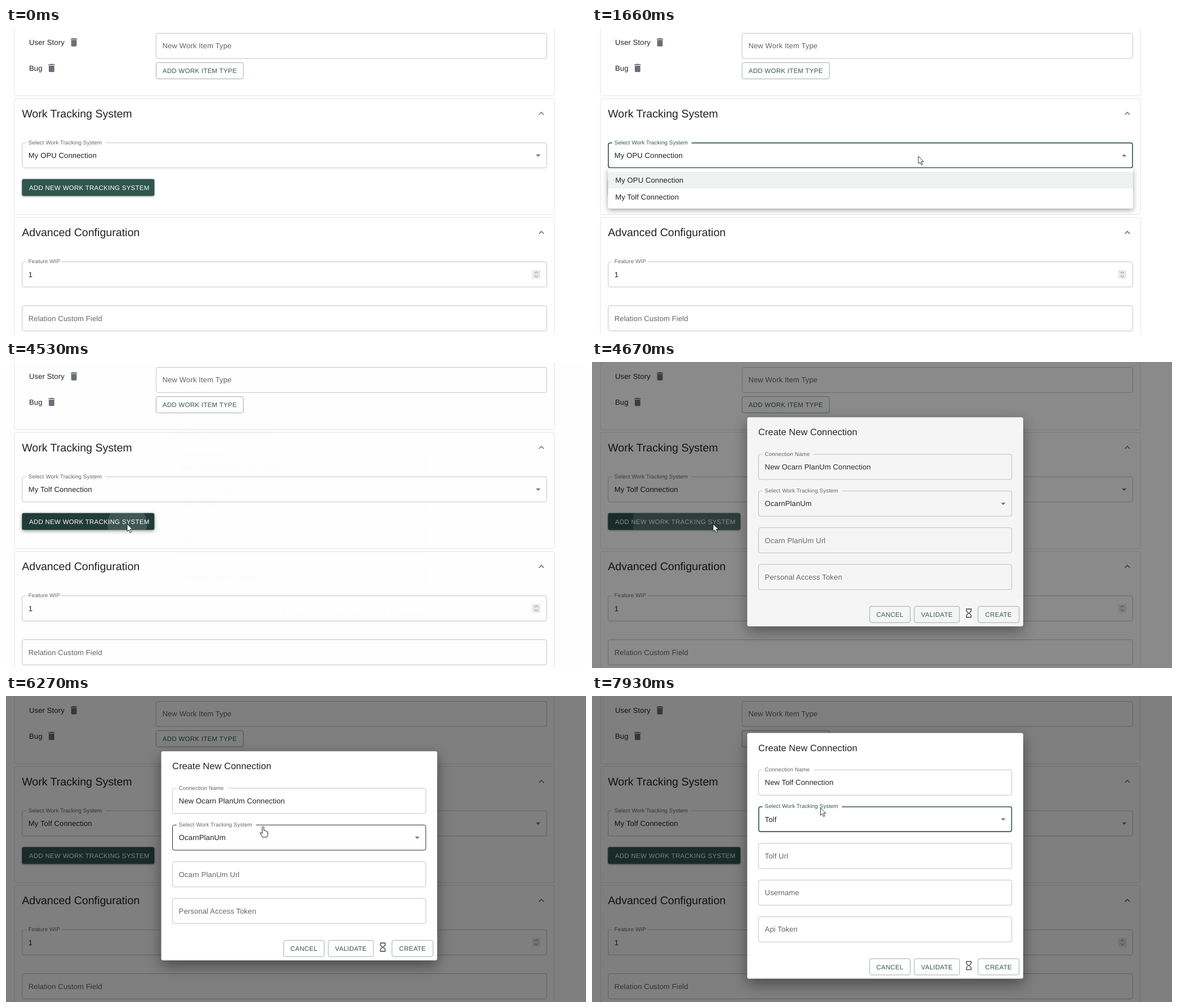
Recreate the animation shown at these times as an HTML page. Size 1029 by 544 pixels, loop 8 s.

```html
<!DOCTYPE html>
<html lang="en">
<head>
<meta charset="utf-8">
<title>Work tracking settings</title>
<style>
  html, body { margin: 0; width: 100%; height: 100%; overflow: hidden; background: #fff; }
  #stage { display: block; width: 100vw; height: 100vh; }
  text { font-family: "Liberation Sans", Arial, sans-serif; fill: #212121; white-space: pre; text-rendering: geometricPrecision; }
  .body { font-size: 13.06px; letter-spacing: .12px; }
  .label { font-size: 9.8px; letter-spacing: .09px; }
  .button { font-size: 11.42px; letter-spacing: .326px; }
  .heading { font-size: 19.58px; }
  .title { font-size: 16.32px; letter-spacing: .12px; }
</style>
</head>
<body>
<svg id="stage" viewBox="0 0 1029 544"></svg>
<script>
const LOOP = 8000, STEP = 70, SCALE = .816, FIELD_H = 45.7, ROW_H = 29.4;
const PRIMARY = '#30574e', GREY = '#666', ICON = '#757575';
const SUITE = 'Ocarn PlanUm', SUITE_ID = 'OcarnPlanUm', TRACKER = 'Tolf';
const CONNECTIONS = ['My OPU Connection', `My ${TRACKER} Connection`];

// Activity bursts; inside each one the picture advances in fixed steps.
const BURSTS = [0, 190, 1040, 1660, 2340, 3180, 4390, 5230, 6200, 7020, 7860];

const EVENTS = {
  pageMenu: { open: 1100, press: 2350, close: 2473 },
  addButton: { hover: 3320, press: 4405, open: 4520 },
  dialogMenu: { open: 6480, press: 7300, close: 7440 },
};

// time, x, y, cursor shape from that moment on
const CURSOR = [
  [190, 1011, 534, 'arrow'], [400, 900, 330, 'arrow'], [610, 815, 232, 'hand'],
  [960, 579, 228, 'hand'], [1100, 579, 228, 'arrow'], [1660, 579, 228, 'arrow'],
  [1870, 541, 263, 'hand'], [2010, 522, 288, 'hand'], [2705, 522, 288, 'arrow'],
  [2820, 522, 288, 'arrow'], [3110, 437, 262, 'arrow'], [3320, 262, 283, 'hand'],
  [3530, 215, 288, 'hand'], [4520, 215, 288, 'arrow'], [4740, 215, 288, 'arrow'],
  [5090, 430, 203, 'beam'], [5160, 453, 194, 'beam'], [5230, 453, 194, 'beam'],
  [5710, 455, 208, 'beam'], [5780, 455, 211, 'arrow'], [6130, 455, 211, 'arrow'],
  [6270, 456, 232, 'hand'], [6410, 457, 249, 'hand'], [6480, 457, 249, 'arrow'],
  [6980, 457, 249, 'arrow'], [7090, 438, 280, 'hand'], [7160, 417, 309, 'hand'],
  [7250, 408, 322, 'hand'], [7600, 408, 322, 'hand'], [7672, 400, 318, 'arrow'],
  [7790, 351, 280, 'beam'], [7860, 401, 225, 'hand'], [7930, 405.5, 199, 'arrow'],
];

const SHAPES = {
  arrow: '<path d="M0 0V13.2L3 10.4 5.2 15.4 7.4 14.4 5.2 9.6H9.4Z" fill="#fff" stroke="#111" stroke-width=".85"/>',
  hand: '<path d="M-1.5 1.2Q0-.6 1.5 1.2V7.2Q3 6.4 4 7.8 5.4 7.2 6.3 8.6 8.2 8.2 8.4 10V14Q8.2 17 6.6 19H-.8Q-2.5 16-4.8 12.6-5.6 10.6-3.6 10.6L-1.5 12.4Z" fill="#fff" stroke="#111" stroke-width=".95"/>',
  beam: '<path d="M-3-8H-.6L0-7.4 .6-8H3M0-7.4V7.4M-3 8H-.6L0 7.4 .6 8H3" fill="none" stroke="#222"/>',
};

const ICONS = {
  trash: 'M6 19c0 1.1.9 2 2 2h8c1.1 0 2-.9 2-2V7H6zM19 4h-3.5l-1-1h-5l-1 1H5v2h14z',
  collapse: 'M12 8l-6 6 1.41 1.41L12 10.83l4.59 4.58L18 14z',
  caret: 'M7 10l5 5 5-5z',
  hourglass: 'M6 2v6l4 4-4 4v6h12v-6l-4-4 4-4V2zm10 14.5V20H8v-3.5l4-4zm-4-5-4-4V4h8v3.5z',
};

const clamp = v => Math.max(0, Math.min(1, v));
const mix = (a, b, p) => a + (b - a) * p;
const inside = (p, x, y, w, h) => p && p.x >= x && p.x <= x + w && p.y >= y && p.y <= y + h;

// cubic-bezier(.4, 0, .2, 1)
function ease(v) {
  const x = clamp(v);
  let low = 0, high = 1;
  for (let i = 0; i < 20; i++) {
    const u = (low + high) / 2, k = 1 - u;
    if (1.2 * k * k * u + .6 * k * u * u + u ** 3 < x) low = u; else high = u;
  }
  return 3 * (1 - low) * low * low + low ** 3;
}

function snap(t) {
  const start = BURSTS.filter(b => b <= t).pop();
  return start + Math.floor((t - start) / STEP) * STEP;
}

function cursorAt(t) {
  const i = CURSOR.findLastIndex(key => key[0] <= t);
  if (i < 0) return null;
  const a = CURSOR[i], b = CURSOR[i + 1] || a;
  const p = b === a ? 0 : (t - a[0]) / (b[0] - a[0]);
  return { x: mix(a[1], b[1], p), y: mix(a[2], b[2], p), shape: a[3] };
}

const text = (kind, x, y, str, fill = '#212121', anchor = 'start') =>
  `<text class="${kind}" x="${x}" y="${y}" text-anchor="${anchor}" style="fill:${fill}">${str}</text>`;

const rect = (x, y, w, h, attrs, r = 3.3) =>
  `<rect x="${x}" y="${y}" width="${w}" height="${h}" rx="${r}" ${attrs}/>`;

const icon = (name, x, y, fill = ICON, turn = 0) =>
  `<path d="${ICONS[name]}" fill="${fill}" transform="translate(${x} ${y}) rotate(${turn}) scale(${SCALE}) translate(-12 -12)"/>`;

const shadow = (y, blur, alpha) => `style="filter:drop-shadow(0 ${y}px ${blur}px rgba(0,0,0,${alpha}))"`;

// notch is the width of the gap in the outline that holds the small label
function field(x, y, w, { label, value, notch, state = 'idle' }) {
  const colour = { idle: '#c0c0c0', hover: '#212121', focus: PRIMARY }[state];
  const line = state === 'focus' ? 1.63 : .95;
  const outline = rect(x + line / 2, y + line / 2, w - line, FIELD_H - line,
    `fill="none" stroke="${colour}" stroke-width="${line}"`);
  if (!value) return outline + text('body', x + 11.6, y + 27.4, label, GREY);
  return outline + rect(x + 7.5, y - 1, notch, 4, 'fill="#fff"', 0)
    + text('label', x + 11.6, y + 3.2, label, state === 'focus' ? PRIMARY : GREY)
    + text('body', x + 11.6, y + 27.4, value);
}

const select = (x, y, w, options) => field(x, y, w, { label: 'Select Work Tracking System', notch: 141, ...options })
  + icon('caret', x + w - 15.7, y + 22.9, ICON, options.open ? 180 : 0);

const outlined = (x, y, w, str) =>
  rect(x + .45, y + .45, w - .9, 28.9, 'fill="none" stroke="#97aba6" stroke-width=".95"')
  + text('button', x + w / 2, y + 19, str, PRIMARY, 'middle');

function ripple(x, y, w, h, at, radius, colour, t, press, release) {
  if (t < press) return '';
  const p = ease((t - press) / 550);
  const alpha = (.1 + .2 * p) * (1 - ease((t - release) / 550));
  return `<svg x="${x}" y="${y}" width="${w}" height="${h}">
    <circle cx="${at.x - x}" cy="${at.y - y}" r="${radius * p}" fill="${colour}" opacity="${alpha}"/></svg>`;
}

const isOpen = (menu, t) => t >= menu.open && t < menu.close;

function dropdown(x, y, w, items, menu, cursor, t) {
  if (t < menu.open || t > menu.close + 232) return '';
  const closing = t >= menu.close;
  const opacity = closing ? 1 - ease((t - menu.close) / 232) : ease((t - menu.open) / 232);
  const s = closing ? 1 - .25 * ease((t - menu.close - 77) / 155) : .75 + .25 * ease((t - menu.open) / 155);
  const rows = items.map((item, i) => {
    const top = y + 6.5 + i * ROW_H;
    const hover = inside(cursor, x, top, w, ROW_H);
    const fill = i === 0 ? `rgba(48,87,78,${hover ? .12 : .08})` : `rgba(0,0,0,${hover ? .04 : 0})`;
    return rect(x, top, w, ROW_H, `fill="${fill}"`, 0)
      + (i === 1 ? ripple(x, top, w, ROW_H, cursor, w * .53, '#000', t, menu.press, menu.close) : '')
      + text('body', x + 13, top + 19.4, item);
  }).join('');
  const cx = x + w / 2;
  return `<g opacity="${opacity}" transform="translate(${cx} ${y}) scale(${s} ${s * s}) translate(${-cx} ${-y})">
    <g ${shadow(3.5, 5, .36)}>${rect(x, y, w, 71.8, 'fill="#fff"')}</g>${rows}</g>`;
}

const card = (y, h) => rect(15, y, 958, h, 'fill="#fff" stroke="#e2e2e2"');

function addButton(t) {
  const { hover, press, open } = EVENTS.addButton;
  const p = ease((t - hover) / 250) - ease((t - open - 10) / 250);
  const fill = `rgb(${mix(48, 33, p)},${mix(87, 60, p)},${mix(78, 54, p)})`;
  return `<g ${shadow(mix(1.3, 2.2, p), mix(1.6, 3, p), .38)}>${rect(28.3, 268.6, 235, 30, `fill="${fill}"`)}</g>`
    + ripple(28.3, 268.6, 235, 30, { x: 215, y: 288 }, 189, '#fff', t, press, open)
    + text('button', 41, 287.6, 'ADD NEW WORK TRACKING SYSTEM', '#fff');
}

function page(t, cursor) {
  const menu = EVENTS.pageMenu, box = [28.2, 203.6, 931.6];
  const focused = t >= menu.open && t < EVENTS.addButton.press;
  const hovered = t < menu.open && inside(cursor, ...box, FIELD_H);
  return card(-20, 140.5) + card(125.2, 206.4) + card(336.9, 260)
    + text('body', 41, 30.1, 'User Story') + icon('trash', 120.5, 25.3, '#6a6f77')
    + text('body', 41, 76, 'Bug') + icon('trash', 80.8, 71, '#6a6f77')
    + field(265.8, 9, 694, { label: 'New Work Item Type' })
    + outlined(265.8, 61.1, 155.8, 'ADD WORK ITEM TYPE')
    + text('heading', 28.2, 159, 'Work Tracking System') + icon('collapse', 949.8, 152, ICON)
    + select(...box, {
      value: CONNECTIONS[t < menu.close ? 0 : 1],
      state: focused ? 'focus' : hovered ? 'hover' : 'idle',
      open: isOpen(menu, t),
    })
    + addButton(t)
    + text('heading', 28.2, 370, 'Advanced Configuration') + icon('collapse', 949.8, 363.6, ICON)
    + field(28.2, 415.2, 931.6, { label: 'Feature WIP', value: '1', notch: 63 })
    + rect(933.5, 430.3, 14.5, 15.4, 'fill="#e8e8e8"', 0)
    + '<path d="M938 436l2.8-2.8 2.8 2.8M938 440l2.8 2.8 2.8-2.8" fill="none" stroke="#666" stroke-width=".9"/>'
    + field(28.2, 493.2, 931.6, { label: 'Relation Custom Field' })
    + dropdown(28.2, 249.2, 931.6, CONNECTIONS, menu, cursor, t);
}

function dialog(t, cursor) {
  const start = EVENTS.addButton.open, menu = EVENTS.dialogMenu;
  if (t < start) return '';
  const switched = t >= menu.close;
  const inputs = switched ? [`${TRACKER} Url`, 'Username', 'Api Token'] : [`${SUITE} Url`, 'Personal Access Token'];
  const h = 241.1 + 65.25 * inputs.length;
  const top = 284.1 - h / 2, x = 295, w = 450.3, foot = top + h - 36;
  const rowY = i => top + 65.3 + 65.25 * i;
  const hovered = i => t < menu.open && inside(cursor, x, rowY(i), w, FIELD_H) ? 'hover' : 'idle';
  const fade = ease((t - start) / 225);
  return `<rect width="1029" height="544" opacity="${fade * .5}"/><g opacity="${fade}">
    <g ${shadow(9, 13, .42)}>${rect(275.4, top, 489.6, h, 'fill="#fff"')}</g>`
    + text('title', x, top + 32, 'Create New Connection')
    + field(x, rowY(0), w, {
      label: 'Connection Name', notch: 91, state: hovered(0),
      value: `New ${switched ? TRACKER : SUITE} Connection`,
    })
    + select(x, rowY(1), w, {
      value: switched ? TRACKER : SUITE_ID,
      state: t >= menu.open ? 'focus' : hovered(1),
      open: isOpen(menu, t),
    })
    + inputs.map((label, i) => field(x, rowY(i + 2), w, { label })).join('')
    + outlined(492.2, foot, 72.8, 'CANCEL') + outlined(571.4, foot, 81, 'VALIDATE')
    + icon('hourglass', 668.5, foot + 12.6, '#555') + outlined(684.4, foot, 73.8, 'CREATE')
    + '</g>' + dropdown(x, 274.5, w, [SUITE_ID, TRACKER], menu, cursor, t);
}

const stage = document.getElementById('stage');
let shown = -1;

function draw() {
  const t = snap(performance.now() % LOOP);
  if (t !== shown) {
    shown = t;
    const cursor = cursorAt(t);
    stage.innerHTML = page(t, cursor) + dialog(t, cursor)
      + (cursor ? `<g transform="translate(${cursor.x} ${cursor.y})">${SHAPES[cursor.shape]}</g>` : '');
  }
  requestAnimationFrame(draw);
}
draw();
</script>
</body>
</html>
```
